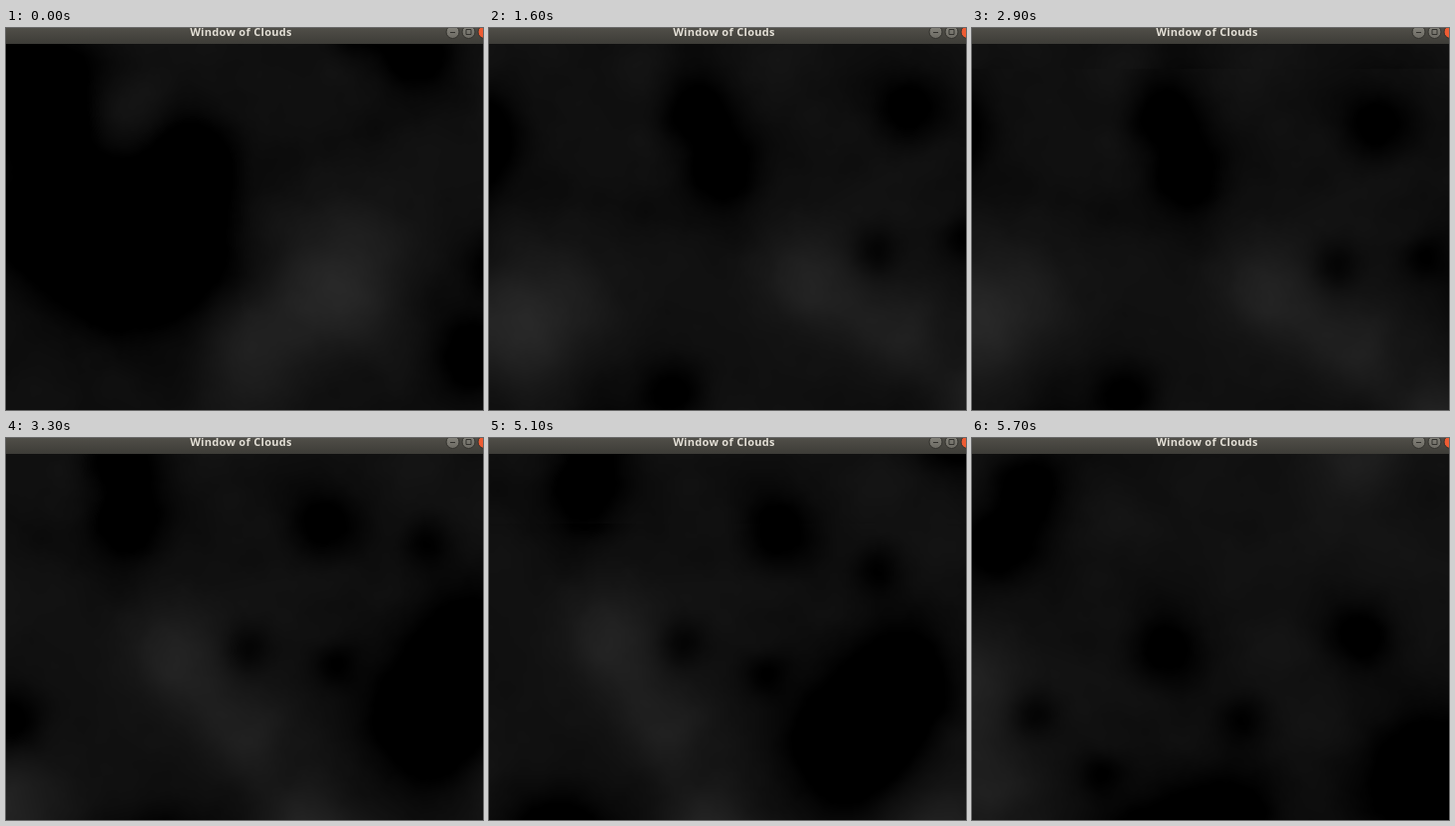
An HTML page with a canvas for the animation above (6 s loop, 480x384 px).

```html
<!DOCTYPE html>
<html lang="en">
<head>
<meta charset="utf-8">
<title>Window of Clouds</title>
<style>
  html, body { margin: 0; width: 100%; height: 100%; overflow: hidden; background: #000; }
  canvas, svg { position: absolute; left: 0; top: 0; display: block; }
  text { font: bold 11px "Open Sans", "Noto Sans", sans-serif; letter-spacing: .3px; fill: #e3dfd6; text-anchor: middle; }
</style>
</head>
<body>
<canvas id="sky" width="480" height="384"></canvas>
<svg width="480" height="16" viewBox="0 0 480 16">
  <defs>
    <linearGradient id="bar" x2="0" y2="1">
      <stop offset="0" stop-color="#504e48"/><stop offset="1" stop-color="#3d3c37"/>
    </linearGradient>
    <linearGradient id="knob" x2="0" y2="1">
      <stop offset="0" stop-color="#87857d"/><stop offset="1" stop-color="#6c6a63"/>
    </linearGradient>
  </defs>
  <rect width="480" height="16" fill="url(#bar)"/>
  <text x="236.5" y="8">Window of Clouds</text>
  <g fill="url(#knob)" stroke="#33322e">
    <circle cx="449.5" cy="4" r="6.5"/>
    <circle cx="465.5" cy="4" r="6.5"/>
    <circle cx="481.5" cy="4" r="6.5" fill="#ee5c33"/>
    <path d="M447 4.5h5M463 1.5h5v5h-5z" fill="none"/>
  </g>
</svg>
<script>
const LOOP = 6000, TOP = 16;
const ctx = document.getElementById("sky").getContext("2d");

// Camera path over a fixed cloud plane: [degrees, x, y]
const path = [
  [-64, 369, 102], [-52, 290, 129], [-28, 140, 190], [-12, 34, 100],
  [0, 0, 0], [-2, 8, 60], [20, -55, 72]
];

// [ms, place on the path, first row redrawn]; rows above a tear keep the earlier view
const steps = [
  [0, 0], [600, .1, 50], [1100, 1], [1500, 1.5], [1600, 1.9], [1900, 1.95, 86],
  [2300, 2, 172], [2400, 2, 87], [2900, 2.05, 41], [3000, 2.1, 41], [3300, 3],
  [3400, 3.5], [3500, 4], [5000, 4.85], [5100, 5, 86], [5200, 5.3], [5300, 5.6], [5700, 6]
];

// Key points of the plane: [x, y, radius]
const bright = [
  [112, 142, 52], [155, 235, 42], [205, 350, 48], [435, 345, 50], [-148, 34, 62],
  [-253, -9, 54], [-104, -237, 44], [-97, 253, 56], [400, -201, 45]
];
const dark = [
  [85, 5, 36], [98, -60, 40], [280, 45, 34], [378, 85, 25], [180, 152, 24], [262, 185, 24],
  [400, 195, 50], [348, 255, 62], [50, 350, 50], [580, 74, 62], [460, -37, 34],
  [-211, -163, 82], [-106, -153, 42], [-126, -318, 64], [-234, -257, 50],
  [-161, 191, 42], [-71, 170, 32]
];
// Wider puffs are stronger; dark ones cut deep enough to reach black
const puffs = [...bright.map(p => [...p, .36]), ...dark.map(p => [...p, -.65])];

const lerp = (a, b, t) => a + (b - a) * t;
const ease = t => t * t * (3 - 2 * t);

function hash(x, y) {
  let h = Math.imul(x, 374761393) ^ Math.imul(y, 668265263);
  h = Math.imul(h ^ h >>> 13, 1274126177);
  return ((h ^ h >>> 16) >>> 0) / 2 ** 31 - 1;
}
function noise(x, y) {
  const i = Math.floor(x), j = Math.floor(y), u = ease(x - i), v = ease(y - j);
  return lerp(lerp(hash(i, j), hash(i + 1, j), u), lerp(hash(i, j + 1), hash(i + 1, j + 1), u), v);
}

function brightness(x, y) {
  let v = 16;
  for (let size = 64; size >= 16; size /= 2) v += size / 20 * noise(x / size, y / size);
  for (const [px, py, r, gain] of puffs)
    v += gain * r * Math.exp(-((x - px) ** 2 + (y - py) ** 2) / (r * r));
  return Math.max(0, v);
}

// Paint the cloud plane once, at a quarter of its size
const CELL = 4, X0 = -440, Y0 = -400, W = 270, H = 205;
const plane = document.createElement("canvas");
plane.width = W;
plane.height = H;
const pctx = plane.getContext("2d"), img = pctx.createImageData(W, H);
for (let n = 0; n < W * H; n++) {
  const v = brightness(X0 + n % W * CELL, Y0 + Math.floor(n / W) * CELL);
  img.data.set([v, v, v, 255], n * 4);
}
pctx.putImageData(img, 0, 0);

function paint([, place, row = TOP]) {
  const i = Math.floor(place), next = path[i + 1] || path[i];
  const [deg, x, y] = path[i].map((v, k) => lerp(v, next[k], place - i));
  ctx.save();
  ctx.beginPath();
  ctx.rect(0, row, 480, 384 - row);
  ctx.clip();
  ctx.translate(x, y);
  ctx.rotate(deg * Math.PI / 180);
  ctx.imageSmoothingQuality = "high";
  ctx.drawImage(plane, X0, Y0, W * CELL, H * CELL);
  ctx.restore();
}

let shown = 0;
function frame() {
  const t = performance.now() % LOOP;
  const past = steps.filter(s => s[0] <= t);
  if (past.length !== shown) {
    shown = past.length;
    past.forEach(paint);
  }
  requestAnimationFrame(frame);
}
frame();
</script>
</body>
</html>
```
